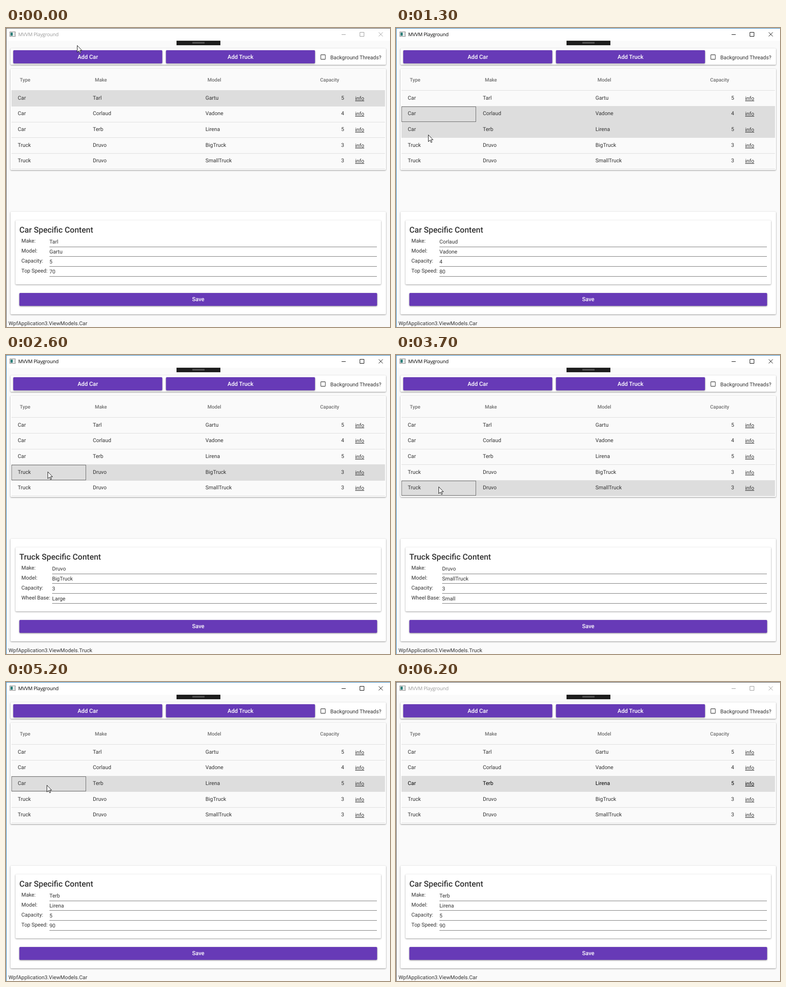
Recreate the animation shown at these times as an HTML page. Size 849x659 px, loop 6300 ms.

```html
<!DOCTYPE html>
<html lang="en">
<head>
<meta charset="utf-8">
<title>MVVM Playground</title>
<style>
  html, body { margin: 0; width: 100%; height: 100%; overflow: hidden; background: #fafafa; }
  svg { display: block; width: 849px; height: 659px; }
  text { font: 11.7px Roboto, sans-serif; fill: #333; text-rendering: geometricPrecision; }
  .title { font: 10.8px "Open Sans", sans-serif; letter-spacing: -.22px; }
  .header { font-size: 10.8px; font-weight: 500; fill: #707070; }
  .heading { font-size: 17.8px; font-weight: 500; }
  .button { font-size: 12.6px; font-weight: 500; fill: #fff; text-anchor: middle; }
  .number { text-anchor: end; }
  .link { text-decoration: underline; }
  .card { filter: drop-shadow(0 1px 1.5px rgba(0, 0, 0, .42)); }
</style>
</head>
<body>
<svg id="stage" viewBox="0 0 849 659"></svg>
<script>
const LOOP = 6300, STEP = 100;
const ROW_TOP = 137.7, ROW_HEIGHT = 34.55;
const VEHICLES = [
  { type: 'Car', make: 'Tarl', model: 'Gartu', capacity: 5, extra: 70 },
  { type: 'Car', make: 'Corlaud', model: 'Vadone', capacity: 4, extra: 80 },
  { type: 'Car', make: 'Terb', model: 'Lirena', capacity: 5, extra: 90 },
  { type: 'Truck', make: 'Druvo', model: 'BigTruck', capacity: 3, extra: 'Large' },
  { type: 'Truck', make: 'Druvo', model: 'SmallTruck', capacity: 3, extra: 'Small' }
];
const CLICKS = [800, 1500, 2600, 3400, 4100, 4700];
const BLUR = 6100;

// The pointer rests at each place until the next move begins.
const HOME = { x: 157, y: 38 };
const MOVES = [
  { from: 0, to: 300, x: 52, y: 187 },
  { from: 900, to: 1300, x: 71, y: 235 },
  { from: 1700, to: 1800, x: 79, y: 241 },
  { from: 1900, to: 2000, x: 90, y: 247 },
  { from: 2000, to: 2200, x: 92, y: 257 },
  { from: 2800, to: 3200, x: 94, y: 290 },
  { from: 3700, to: 3900, x: 92, y: 259 },
  { from: 4200, to: 4500, x: 90, y: 227 },
  { from: 5200, to: 5700, x: 74, y: 596 },
  { from: 5700, to: 5900, x: 70, y: 670 }
];

const stage = document.getElementById('stage');

function set(node, attrs) {
  for (const key in attrs) node.setAttribute(key, attrs[key]);
}
function add(tag, attrs, content) {
  const node = document.createElementNS('http://www.w3.org/2000/svg', tag);
  set(node, attrs);
  if (content !== undefined) node.textContent = content;
  return stage.appendChild(node);
}
function rect(x, y, width, height, fill, more) {
  return add('rect', { x, y, width, height, fill, ...more });
}
function text(x, y, content, cls = '') {
  return add('text', { x, y, class: cls }, content);
}
function path(d, stroke) {
  return add('path', { d, stroke, fill: 'none' });
}
function card(x, y, width, height, fill = '#fff') {
  return rect(x, y, width, height, fill, { rx: 2, class: 'card' });
}
function button(x, y, width, height, label) {
  const face = card(x, y, width, height, '#673ab7');
  text(x + width / 2, Math.round(y + height / 2 + 4), label, 'button');
  return face;
}

// Window frame
rect(0, 0, 849, 659, '#fafafa');
rect(0, 0, 849, 28, '#fff');
rect(8.5, 8.5, 12, 10, '#fff', { stroke: '#777' });
rect(10, 10, 5, 7, '#2d7d78');
rect(17, 10, 2, 7, '#c8d0d0');
const title = text(27, 18, 'MVVM Playground', 'title');
const controls = path('M742 14.5h9M782.5 9.5h9v9h-9zM824 9.5l9 9m0-9l-9 9');
const frame = path('M849 .5H.5V659');
rect(377, 28, 97, 10, '#1e1e1e');
path('M412 31.5h27m-27 2h27', '#777');

// Toolbar
card(10, 45, 830, 36);
button(16, 49, 329.5, 29, 'Add Car');
button(353.7, 49, 329.5, 29, 'Add Truck');
rect(696, 59, 10, 10, '#fff', { rx: 1, stroke: '#555', 'stroke-width': 1.3 });
text(717, 69, 'Background Threads?');

// Table
card(10, 90, 830, 223);
rect(12, 91, 826, 220, '#fafafa');
[[30.5, 'Type'], [196.5, 'Make'], [445.5, 'Model'], [694.5, 'Capacity']]
  .forEach(([x, label]) => text(x, 118, label, 'header'));
path('M12 137.5H838', '#ddd');
const rows = VEHICLES.map((v, i) => {
  const top = Math.round(ROW_TOP + ROW_HEIGHT * i);
  const bottom = Math.round(ROW_TOP + ROW_HEIGHT * (i + 1));
  const base = Math.round(ROW_TOP + ROW_HEIGHT * i + 20.2);
  path(`M12 ${bottom + .5}H838`, '#ddd');
  const back = rect(12, top, 826, bottom - top + 1, '#ddd');
  const focus = rect(12.5, top + 1.5, 164, bottom - top - 2, 'none', { stroke: '#686868' });
  const cells = [
    text(26, base, v.type),
    text(192, base, v.make),
    text(441, base, v.model),
    text(747.5, base, v.capacity, 'number'),
    text(772, base + 1, 'info', 'link')
  ];
  return { back, focus, cells };
});

// Details
card(10, 405, 830, 226);
card(21, 424, 808, 141);
const heading = text(29.5, 451, '', 'heading');
const fields = ['Make:', 'Model:', 'Capacity:', ''].map((label, i) => ({
  label: text(34, 473 + 22 * i, label),
  value: text(96, 475 + 22 * i, ''),
  line: path('', '#757575')
}));
const save = button(29.5, 584, 791, 28.5, 'Save');
const status = text(5.5, 654.5, '');

const pointer = add('path', {
  d: 'M.5 .5V15.5L4 12.2 6.6 17.4 8.7 16.4 6.2 11.4H10.9Z',
  fill: '#fff', stroke: '#111'
});

function pointerAt(time) {
  let { x, y } = HOME;
  for (const move of MOVES) {
    const progress = Math.min(1, Math.max(0, (time - move.from) / (move.to - move.from)));
    const eased = 1 - (1 - progress) ** 2.4;
    x += (move.x - x) * eased;
    y += (move.y - y) * eased;
  }
  return { x, y };
}

function rowAt(y) {
  return Math.floor((y - ROW_TOP) / ROW_HEIGHT);
}

function render(time) {
  const active = time >= CLICKS[0] && time < BLUR;
  const click = CLICKS.filter(t => t <= time).pop();
  const selected = click ? rowAt(pointerAt(click).y) : 0;
  const { x, y } = pointerAt(time);
  // Hover effects follow the pointer one step late.
  const hoverY = pointerAt(time - STEP).y;

  const ink = active ? '#000' : '#999';
  title.style.fill = ink;
  set(controls, { stroke: ink });
  set(frame, { stroke: active ? '#1a73b5' : '#444' });

  rows.forEach(({ back, focus, cells }, i) => {
    const isSelected = i === selected;
    const dark = isSelected && time >= BLUR + STEP;
    set(back, { opacity: isSelected || i === rowAt(hoverY) ? 1 : 0 });
    set(focus, { opacity: active && isSelected ? 1 : 0 });
    cells.forEach(cell => { cell.style.fill = dark ? '#000' : ''; });
  });

  const vehicle = VEHICLES[selected];
  const isCar = vehicle.type === 'Car';
  const left = isCar ? 96 : 102;
  heading.textContent = `${vehicle.type} Specific Content`;
  status.textContent = `WpfApplication3.ViewModels.${vehicle.type}`;
  fields[3].label.textContent = isCar ? 'Top Speed:' : 'Wheel Base:';
  ['make', 'model', 'capacity', 'extra'].forEach((key, i) => {
    const { value, line } = fields[i];
    value.textContent = vehicle[key];
    set(value, { x: left });
    set(line, { d: `M${left} ${Math.floor(482 + 21.75 * i) + .5}H820` });
  });

  set(save, { opacity: hoverY > 584 && hoverY < 612 ? .95 : 1 });
  set(pointer, { transform: `translate(${Math.round(x)} ${Math.round(y)})`, opacity: time < BLUR - 2 * STEP ? 1 : 0 });
}

const start = performance.now();
function tick() {
  const time = (performance.now() - start) % LOOP;
  render(Math.floor(time / STEP) * STEP);
  requestAnimationFrame(tick);
}
tick();
</script>
</body>
</html>
```
